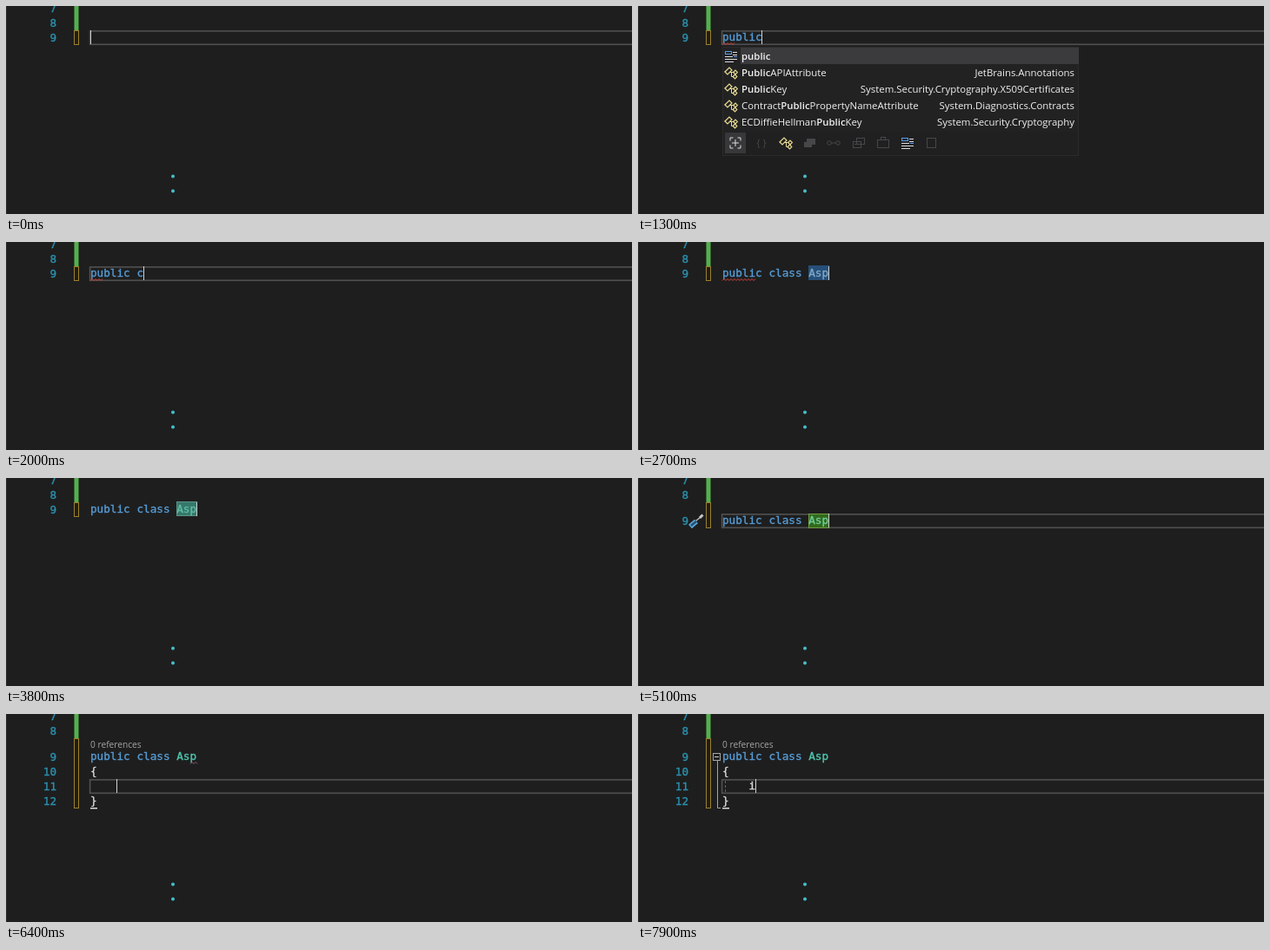
Animation, 720 px wide and 240 px high, one loop 8000 ms. Source, as an HTML page with a canvas:

```html
<!DOCTYPE html>
<html lang="en">
<head>
<meta charset="utf-8">
<title>Typing a class</title>
<style>
  html, body { margin: 0; width: 100%; height: 100%; overflow: hidden; background: #1e1e1e; }
  canvas { display: block; }
</style>
</head>
<body>
<canvas id="stage" width="720" height="240"></canvas>
<script>
const ctx = document.getElementById('stage').getContext('2d');
const LOOP = 8000, LEFT = 97, CHAR = 7.63;
const CODE = '12.67px "DejaVu Sans Mono", monospace';
const UI = '11.4px "Open Sans", sans-serif';
const UI_BOLD = '600 ' + UI;
const KEYWORD = '#569cd6', TYPE = '#4ec9b0', PLAIN = '#dcdcdc', BRIGHT = '#f1f1f1';
const BLUE = '#5b9bea', GOLD = '#e9dc93';

const SUGGESTIONS = [
  ['public', ''],
  ['PublicAPIAttribute', 'JetBrains.Annotations'],
  ['PublicKey', 'System.Security.Cryptography.X509Certificates'],
  ['ContractPublicPropertyNameAttribute', 'System.Diagnostics.Contracts'],
  ['ECDiffieHellmanPublicKey', 'System.Security.Cryptography']
];

function rect(x, y, w, h, color) {
  ctx.fillStyle = color;
  ctx.fillRect(x, y, w, h);
}

function frame(x, y, w, h, color) {
  ctx.strokeStyle = color;
  ctx.lineWidth = 1;
  ctx.strokeRect(x + .5, y + .5, w - 1, h - 1);
}

function path(points, color, width = 1) {
  ctx.strokeStyle = color;
  ctx.lineWidth = width;
  ctx.beginPath();
  points.forEach(([x, y]) => ctx.lineTo(x, y));
  ctx.stroke();
}

function text(value, x, y, color, font = UI, align = 'left') {
  ctx.font = font;
  ctx.textAlign = align;
  ctx.fillStyle = color;
  ctx.fillText(value, x, y);
  return x + ctx.measureText(value).width;
}

// Code is a little heavier than the regular weight
function code(value, x, y, color, align) {
  text(value, x, y, color, CODE, align);
  ctx.strokeStyle = color;
  ctx.lineWidth = .35;
  ctx.strokeText(value, x, y);
}

function squiggle(x, end, y, color) {
  const points = [];
  for (let i = 0; x + i * 2 <= end; i++) points.push([x + i * 2, y + (i % 2 ? -1 : 1)]);
  path(points, color);
}

function diamond(x, y, r, color) {
  path([[x - r, y], [x, y - r], [x + r, y], [x, y + r], [x - r, y]], color, 1.2);
}

function classIcon(x, y) {
  path([[x - 7, y - 1], [x - 2, y - 6], [x + 1, y - 3], [x - 4, y + 2], [x - 7.5, y - 1.5]], GOLD, 1.2);
  path([[x - 1, y - .5], [x + 3, y - .5]], GOLD);
  path([[x + .5, y - .5], [x + .5, y + 4.5], [x + 2, y + 4.5]], GOLD);
  diamond(x + 5, y - .5, 2.3, GOLD);
  diamond(x + 4.5, y + 4.5, 2.3, GOLD);
}

function keywordIcon(x, y) {
  frame(x - 7, y - 6, 8, 4, BLUE);
  rect(x + 2, y - 5, 5, 1, PLAIN);
  rect(x + 2, y - 2, 5, 1, PLAIN);
  rect(x - 7, y, 9, 1, PLAIN);
  rect(x + 3, y, 4, 1, BLUE);
  rect(x - 7, y + 3, 14, 1, PLAIN);
  rect(x - 7, y + 6, 10, 1, PLAIN);
}

function filterBar() {
  const dim = '#47474a', y = 158;
  rect(98, 145, 408, 27, '#202021');
  rect(100, 146, 24, 24, '#38383a');
  for (const sx of [-1, 1]) for (const sy of [-1, 1]) {
    path([[112 + sx * 2.5, y + sy * 6], [112 + sx * 6, y + sy * 6], [112 + sx * 6, y + sy * 2.5]], PLAIN);
  }
  rect(108, y - .5, 8, 1, PLAIN);
  rect(111.5, y - 4, 1, 8, PLAIN);
  text('{ }', 142, 162, dim, UI, 'center');
  classIcon(170, y);
  rect(194, 153, 10, 7, dim);
  rect(191, 157, 9, 6, dim);
  path([[222, y], [228, y]], dim);
  for (const x of [220, 230]) {
    ctx.beginPath();
    ctx.arc(x, y, 2.3, 0, 7);
    ctx.stroke();
  }
  frame(251, 152, 10, 8, dim);
  frame(247, 156, 10, 8, dim);
  rect(249, 159, 6, 1, dim);
  frame(275, 154, 14, 10, dim);
  frame(279, 151, 6, 4, dim);
  keywordIcon(310, y);
  frame(332, 152, 11, 12, dim);
}

function popup(typed) {
  rect(97, 47, 410, 126, '#222223');
  frame(97, 47, 410, 126, '#2b2b2d');
  rect(118, 48, 389, 19, '#3b3b3d');
  SUGGESTIONS.forEach(([name, namespace], row) => {
    const y = 62 + row * 19;
    const start = name.toLowerCase().indexOf('public');
    row ? classIcon(107, y - 4) : keywordIcon(107, y - 4);
    let x = text(name.slice(0, start), 119, y, BRIGHT);
    x = text(name.slice(start, start + typed), x, y, BRIGHT, UI_BOLD);
    text(name.slice(start + typed), x, y, BRIGHT);
    text(namespace, 502, y, BRIGHT, UI, 'right');
  });
  filterBar();
}

function screwdriver() {
  path([[66, 50], [72, 45]], '#b8b8b8', 1.5);
  path([[71, 46], [74.5, 42.5]], '#c8c8c8', 3);
  path([[60, 56], [67, 50]], '#58a6dc', 6);
  path([[61, 55], [67, 50]], '#24536f', 2.5);
}

function currentLine(top) {
  ctx.strokeStyle = '#505050';
  ctx.lineWidth = 1.6;
  ctx.strokeRect(96.6, top + .9, 640, 15.4);
}

function nameBox(t, top) {
  if (t < 2600 || t >= 5500) return TYPE;
  const [fill, edge, color] = t < 3200 ? ['#264f78', '#264f78', '#7fa9c9']
    : t < 4800 ? ['#35786c', '#5c9484', '#61bda4']
    : ['#316b1d', '#729c3d', '#6fcf9b'];
  rect(196, top, 24, 17, fill);
  frame(196, top, 24, 17, edge);
  return color;
}

// Number of characters typed: one per 100 ms from start
const typedCount = (t, start, max) => Math.max(0, Math.min(max, Math.floor((t - start) / 100) + 1));

function draw(t) {
  rect(0, 0, 720, 240, '#1e1e1e');
  rect(0, 0, 1, 240, '#303030');
  for (const y of [196.5, 213.5]) {
    ctx.fillStyle = '#45bfca';
    ctx.beginPath();
    ctx.arc(192, y, 2, 0, 7);
    ctx.fill();
  }

  const top = t < 4000 ? 28 : 41;
  const baseline = top + 12;
  const opened = t >= 5700, braces = t >= 5900, expanded = t >= 6100;
  const lastLine = expanded ? 12 : opened ? 10 : 9;
  const numbers = '#2b91af';

  code('7', 58, 7, numbers, 'right');
  code('8', 58, 24, numbers, 'right');
  for (let n = 9; n <= lastLine; n++) {
    code(n, 58, top + 13 + (n - 9) * 17, numbers, 'right');
  }
  rect(78.5, 0, 5, 28, '#54b04f');
  frame(78, 28, 6, top - 11 + (lastLine - 9) * 17, '#9c8029');

  // Line highlight hides while the name is selected
  const activeTop = expanded ? 75 : opened ? 58 : top;
  if (t < 2600 || t >= 4800) currentLine(activeTop);

  const publicCount = typedCount(t, 700, 6);
  const classCount = typedCount(t, 2000, 5);
  code('public'.slice(0, publicCount), LEFT, baseline, KEYWORD);
  code('class'.slice(0, classCount), LEFT + 7 * CHAR, baseline, KEYWORD);
  const nameColor = nameBox(t, top - (t < 4000 ? 1 : 0));
  if (t >= 2600) code('Asp', LEFT + 13 * CHAR, baseline, nameColor);

  if (t >= 900 && t < 3200) squiggle(LEFT, t < 2100 ? 112 : 135, 43.5, '#d9433b');
  if (t >= 4300 && t < 5500) screwdriver();
  if (t >= 5900) text('0 references', LEFT, 39, '#a5a5a5', '10.2px "Open Sans", sans-serif');
  if (t >= 6100 && t < 7300) squiggle(212, 220, 56.5, '#8a5a7c');

  if (braces) code(expanded ? '{' : '{}', LEFT, 70, PLAIN);
  if (expanded) {
    code('}', LEFT, 104, PLAIN);
    rect(97, 108, 8, 1.5, PLAIN);
  }
  if (t >= 7300) {
    frame(86, 45, 9, 9, '#a5a5a5');
    rect(88, 49, 5, 1, '#d0d0d0');
    path([[91.5, 54], [91.5, 108.5], [95, 108.5]], '#a5a5a5');
    for (let y = 77; y < 91; y += 5) rect(100, y, 1, 3, '#666');
  }
  if (t >= 7700) code('i', LEFT + 4 * CHAR, 87, PLAIN);

  const column = t < 1700 ? publicCount
    : t < 2000 ? 7
    : t < 2600 ? 7 + classCount
    : !opened ? 16
    : expanded ? (t < 7700 ? 4 : 5)
    : braces ? 1 : 0;
  const caretHidden = [[200, 700], [3200, 3700], [4300, 4800], [6600, 7300]]
    .some(([from, to]) => t >= from && t < to);
  if (!caretHidden) rect(Math.floor(LEFT + column * CHAR), activeTop, 1, 16, '#d0d0d0');

  if (t >= 900 && t < 1700) popup(publicCount);
}

function tick() {
  draw(performance.now() % LOOP);
  requestAnimationFrame(tick);
}
tick();
</script>
</body>
</html>
```
